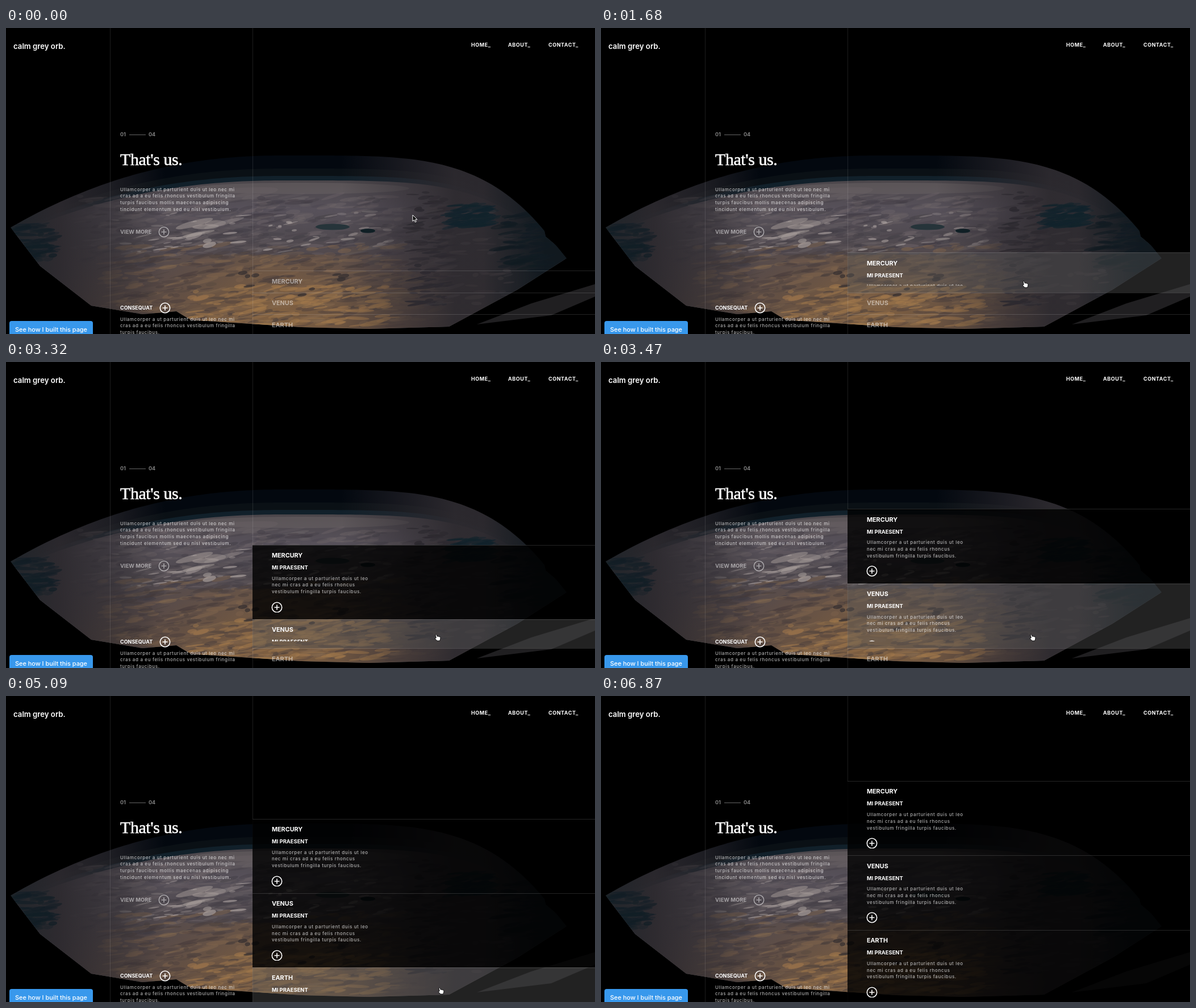
Animation, 1037 px wide and 540 px high, one loop 7.47 s. Source, as an HTML page with a canvas:

```html
<!DOCTYPE html>
<html lang="en">
<head>
<meta charset="utf-8">
<title>Planet page</title>
<style>
html, body { margin: 0; width: 100%; height: 100%; overflow: hidden; background: #000; }
#stage { position: relative; width: 1037px; height: 540px; overflow: hidden; color: #fff; font: 700 9px/12px Inter, sans-serif; }
#stage * { position: absolute; box-sizing: border-box; white-space: pre; }
canvas { left: 0; top: 0; }
.rule { top: 0; width: 1px; height: 540px; background: rgba(255,255,255,.11); }
.brand { font-size: 13.2px; font-weight: 600; }
.nav { letter-spacing: .55px; }
.dim { opacity: .5; }
.dash { width: 29px; height: 1px; background: #fff; opacity: .4; }
.head { font: 30px/36px "Liberation Serif", serif; letter-spacing: -.45px; -webkit-text-stroke: .6px #fff; }
.body { font: 500 8px/11.8px Inter, sans-serif; letter-spacing: .64px; color: rgba(255,255,255,.68); }
.button { left: 6px; top: 517px; width: 147px; height: 30px; border-radius: 4px; background: #3898ec; }
.press { font-weight: 500; font-size: 10.9px; }
.more { font-size: 9.4px; }
.title { font-size: 10.8px; }
.sub { font-size: 9.4px; }
#rows { left: 434px; bottom: -4px; width: 603px; }
#stage .row { position: relative; width: 603px; border-top: 1px solid rgba(255,255,255,.14); }
.inner { inset: -1px 0 12px; overflow: hidden; }
svg { overflow: visible; }
</style>
</head>
<body>
<div id="stage">
  <canvas id="planet" width="1037" height="540"></canvas>
  <div class="rule" style="left:183px"></div>
  <div class="rule" style="left:434px"></div>
  <div id="rows"></div>
  <div class="button"></div>
  <svg id="cursor" width="12" height="16">
    <path id="arrow" d="M0 0V11L2.6 8.6 4.4 12.6 6.2 11.8 4.4 8H8Z" fill="#000" stroke="#fff"/>
    <path id="hand" d="M1 1Q2-.3 3 1L4.3 4.3Q6 3.6 6.6 4.6 8 4 8.6 5.2 10 5 10 6.5L9.6 9.5 8.6 12H4L.2 8Q0 6.6 2.3 7Z" fill="#fff" stroke="#000" stroke-width=".9"/>
  </svg>
</div>
<script>
const $ = id => document.getElementById(id);
const stage = $('stage');

// ---------- planet ----------
const ctx = $('planet').getContext('2d');
let seed = 11;
const rnd = (a = 0, b = 1) => {
  seed = (seed * 16807) % 2147483647;
  return a + (b - a) * seed / 2147483647;
};

// Height of the curved horizon: a long slope to the left, a rounder shoulder to the right.
const horizon = (x, top, inset) => x < 490
  ? top + (352 - top) * ((490 - x) / (482 - inset)) ** 2.2
  : top + (358 - top) * ((x - 490) / (458 - inset / 3)) ** 4.2;

function dome(top, inset, fill) {
  ctx.beginPath();
  for (let x = 0; x <= 1000; x += 8) ctx.lineTo(x, horizon(x, top, inset));
  ctx.lineTo(1000, 540);
  ctx.lineTo(0, 540);
  ctx.fillStyle = fill;
  ctx.fill();
}
function polygon(points) {
  ctx.beginPath();
  points.split(' ').forEach(point => ctx.lineTo(...point.split(',')));
}
function fade(gradient, ...colors) {
  colors.forEach((color, i) => gradient.addColorStop(i / (colors.length - 1), color));
  ctx.fillStyle = gradient;
  ctx.fillRect(0, 200, 1037, 340);
}
const across = (from, to) => ctx.createLinearGradient(from, 0, to, 0);

function spot(x, y, rx, ry, fill, alpha = 1, turn = 0) {
  ctx.globalAlpha = alpha;
  ctx.fillStyle = fill;
  ctx.beginPath();
  ctx.ellipse(x, y, rx, ry, turn, 0, 7);
  ctx.fill();
  ctx.globalAlpha = 1;
}
// Uneven flakes spread over a box.
function scatter(count, left, right, top, bottom, size, fill, alpha = .5) {
  while (count--)
    spot(rnd(left, right), rnd(top, bottom), size * rnd(.2, 1), size * rnd(.04, .16), fill, alpha * rnd(.4, 1), rnd(-.3, .05));
}

function drawPlanet() {
  polygon('829,523 925,486 1037,452 1037,474 960,507');
  ctx.fillStyle = '#201f21';
  ctx.fill();
  ctx.save();
  polygon('8,352 8,200 1000,200 945,340 950,368 992,403 900,462 780,527 640,531 520,528 325,515 300,500 240,505 150,490 60,420');
  ctx.clip();
  dome(225, 0, '#03080f');
  dome(248, 8, '#0a1015');
  dome(261, 20, '#11202a');
  const ground = ctx.createLinearGradient(0, 268, 0, 530);
  ['#4b464a', '#57515a', '#504a50', '#54494a', '#5b4b44', '#5c4a40'].forEach((c, i) => ground.addColorStop(i / 5, c));
  dome(269, 36, ground);
  ctx.globalCompositeOperation = 'source-atop';
  spot(520, 283, 190, 10, '#716a69', .4);
  spot(330, 303, 150, 13, '#6d6566', .3, -.12);

  // Golden land low in the middle
  ctx.save();
  ctx.scale(1, .38);
  fade(ctx.createRadialGradient(500, 1320, 0, 500, 1320, 260), '#8d683f', 'rgba(141,104,63,.6)', 'rgba(141,104,63,0)');
  ctx.restore();
  ctx.save();
  ctx.beginPath();
  ctx.rect(0, 400, 1037, 140);
  ctx.clip();
  fade(ctx.createRadialGradient(480, 510, 0, 480, 510, 250), 'rgba(146,107,65,.7)', 'rgba(130,97,64,.4)', 'rgba(120,92,64,0)');
  ctx.restore();

  scatter(260, 130, 700, 295, 400, 26, '#6d6467');
  scatter(220, 130, 720, 300, 420, 26, '#403b43');
  scatter(260, 170, 690, 380, 525, 26, '#82664c');
  scatter(260, 170, 720, 395, 525, 24, '#453a39');
  scatter(120, 320, 690, 455, 525, 26, '#a0774a', .7);
  scatter(60, 190, 680, 322, 398, 15, '#aaa09e', .7);
  scatter(9, 300, 390, 340, 385, 38, '#a79d9a', .7);
  scatter(40, 685, 790, 425, 520, 30, '#6b5644', .6);
  for (let i = 0; i < 9; i++)
    spot(rnd(400, 600), rnd(432, 475), rnd(4, 11), rnd(2, 4), '#322c2e', .7, -.15);

  // Shaded sides with ragged edges
  fade(across(0, 280), '#1f2429', 'rgba(44,41,46,.95)', 'rgba(45,42,47,.6)', 'rgba(45,42,47,0)');
  fade(across(590, 790), 'rgba(47,43,49,0)', 'rgba(47,43,49,.45)', 'rgba(45,42,47,.95)');
  fade(across(840, 950), 'rgba(17,25,31,0)', '#11191f');
  scatter(110, 715, 780, 290, 490, 24, '#2b282e', .9);
  scatter(60, 740, 900, 310, 490, 22, '#3c373b');
  scatter(70, 18, 85, 346, 410, 26, '#101c24', .7);
  scatter(80, 785, 850, 312, 350, 26, '#10212a', .8);
  scatter(80, 870, 955, 325, 430, 30, '#0f1920', .7);
  spot(575, 351, 30, 5.5, '#26343a');
  spot(637, 358, 13, 3.8, '#101f25');
  ctx.restore();
}

// ---------- page ----------
// Each label is placed by its left edge and middle line.
function label(text, x, y, kind, parent = stage, height = 12) {
  const el = document.createElement('div');
  el.className = kind;
  el.textContent = text;
  el.style.cssText = `left:${x}px;top:${y - height / 2}px`;
  parent.append(el);
  return el;
}
function plus(x, y, parent = stage, opacity = 1) {
  parent.insertAdjacentHTML('beforeend',
    `<svg width="20" height="20" style="left:${x - 10}px;top:${y - 10}px" opacity="${opacity}" fill="none" stroke="#fff" stroke-width="1.6">
      <circle cx="10" cy="10" r="8.7"/><path d="M5.5 10h9M10 5.5v9"/></svg>`);
}
function buildPage() {
  label('calm grey orb.', 13, 32, 'brand');
  label('HOME_', 819, 30, 'nav');
  label('ABOUT_', 884, 30, 'nav');
  label('CONTACT_', 955, 30, 'nav');
  label('01', 201, 188, 'dim');
  label('', 217, 188, 'dash', stage, 1);
  label('04', 251, 188, 'dim');
  label("That's us.", 201, 232, 'head', stage, 36);
  label('Ullamcorper a ut parturient duis ut leo nec mi\ncras ad a eu felis rhoncus vestibulum fringilla\nturpis faucibus mollis maecenas adipiscing\ntincidunt elementum sed eu nisl vestibulum.', 201, 285.5, 'body');
  label('VIEW MORE', 201, 359.5, 'more dim');
  plus(278, 359.5, stage, .5);
  label('CONSEQUAT', 201, 494, '');
  plus(280, 494);
  label('Ullamcorper a ut parturient duis ut leo nec mi\ncras ad a eu felis rhoncus vestibulum fringilla\nturpis faucibus.', 201, 514.5, 'body');
  stage.append(stage.querySelector('.button'));
  label('See how I built this page', 16, 531.5, 'press');
  stage.append($('cursor'));
}
function buildRow(row) {
  row.el = document.createElement('div');
  row.el.className = 'row';
  const inner = document.createElement('div');
  inner.className = 'inner';
  row.el.append(inner);
  row.title = label(row.name, 34, 19.3, 'title', inner);
  label('MI PRAESENT', 34, 40.3, 'sub', inner);
  label('Ullamcorper a ut parturient duis ut leo\nnec mi cras ad a eu felis rhoncus\nvestibulum fringilla turpis faucibus.', 34, 60, 'body', inner);
  plus(43, 110, inner);
  $('rows').append(row.el);
}

// ---------- motion ----------
const LOOP = 7470, STEP = 140, EXIT = 6130;
// Pointer arrives, row opens; the pointer travels by dx, dy to get there.
const rows = [
  { name: 'MERCURY', hover: 780, open: 1476, dx: 26, dy: 116 },
  { name: 'VENUS', hover: 2520, open: 3176, dx: 13, dy: 34 },
  { name: 'EARTH', hover: 4230, open: 4908, dx: 6, dy: 34 }
];
// The picture rests between these moments and then advances in steps.
const beats = [0, 600, 1530, 2430, 3320, 4210, 4950, EXIT];

const part = (t, start, span) => Math.min(1, Math.max(0, (t - start) / span));
const ease = x => x < .5 ? 4 * x ** 3 : 1 - 4 * (1 - x) ** 3;

function stepped(phase) {
  const beat = beats.findLast(b => b <= phase);
  return beat + Math.floor((phase - beat) / STEP) * STEP;
}
// Up to 450 ms after a beat the motion runs; afterwards it waits for the next beat.
function settle(t) {
  const beat = beats.findLast(b => b <= t);
  return beat === EXIT ? t : beat ? Math.min(t, beat + 3 * STEP) : 0;
}

function render(now) {
  const t = settle(stepped(now % LOOP));
  let x = 716, y = 330 + 45 * part(t, EXIT - 80, 350);
  rows.forEach((row, i) => {
    const last = i === rows.length - 1;
    const lit = part(t, row.hover, 240);
    const dark = last ? part(t, EXIT - 80, 750) : part(t, rows[i + 1].hover - 300, 290);
    const grey = Math.round(85 * (1 - dark));
    const go = part(t, row.hover - 340, 400);
    x += row.dx * go;
    y += row.dy * go;
    row.el.style.height = 38.6 + 92.7 * ease(part(t, row.open, 440)) + 'px';
    row.el.style.background = `rgba(${grey},${grey},${grey},${lit * (.4 + .41 * dark)})`;
    row.title.style.opacity = .5 + .5 * lit;
  });
  $('cursor').style.transform = `translate(${x}px,${y}px)`;
  const inside = t > rows[0].hover;
  $('arrow').style.display = inside ? 'none' : '';
  $('hand').style.display = inside ? '' : 'none';
}

drawPlanet();
buildPage();
rows.forEach(buildRow);
const began = performance.now();
function loop() {
  render(performance.now() - began);
  requestAnimationFrame(loop);
}
loop();
</script>
</body>
</html>
```
